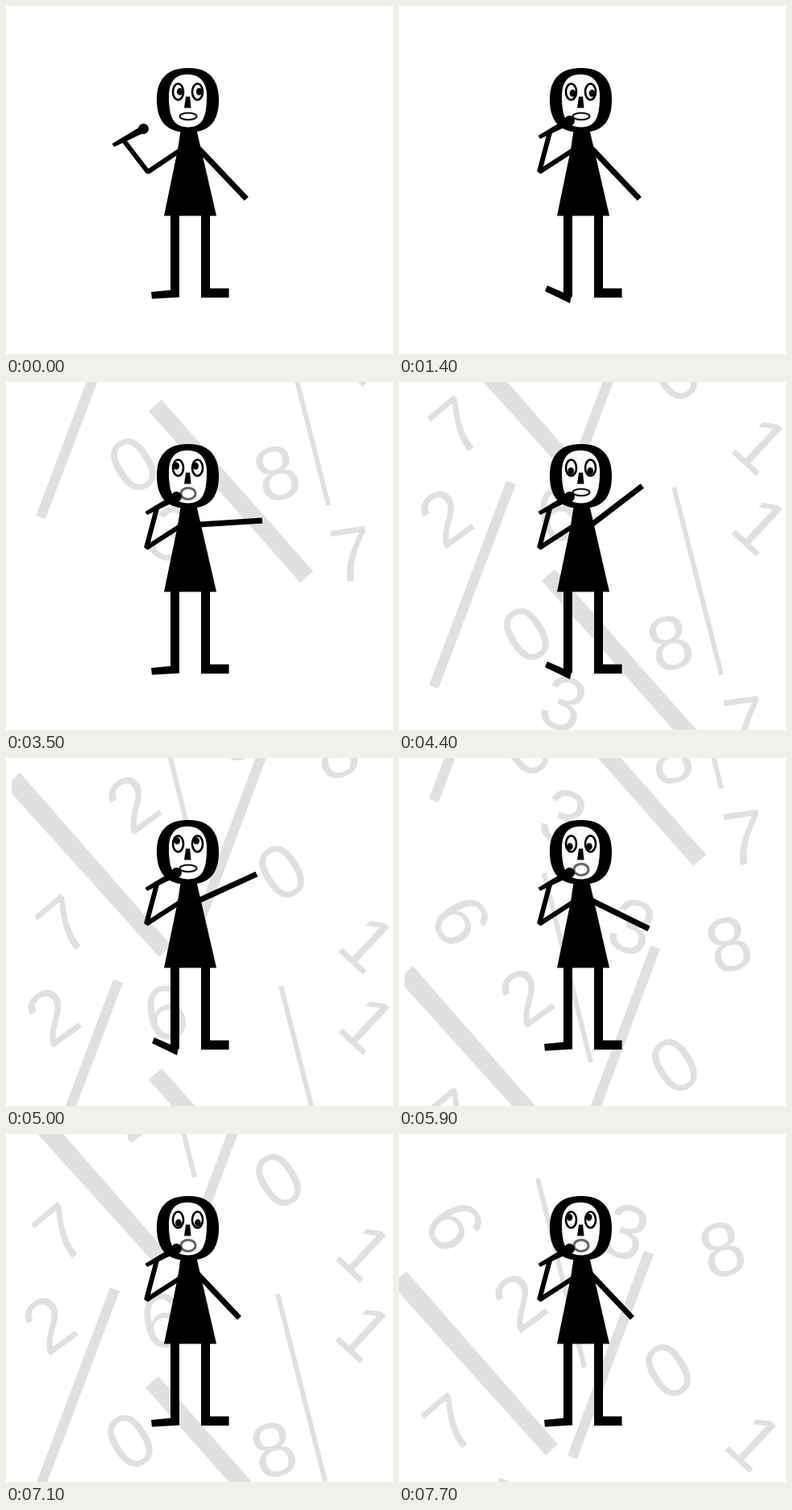
These frames come from a looping animation (480x432 px, 8 s). An HTML page:

```html
<!DOCTYPE html>
<html lang="en">
<head>
<meta charset="utf-8">
<title>Singer and falling numbers</title>
<style>
  html, body { margin: 0; overflow: hidden; background: #fff; }
  svg { display: block; width: 100vw; height: 100vh; }
  .rain { fill: #e0e0e0; stroke: #e0e0e0; }
  text { stroke: none; font: 95px "Liberation Sans", Arial, sans-serif; text-anchor: middle; }
  .limb { fill: none; stroke: #000; stroke-linejoin: bevel; }
  .eye { fill: #fff; stroke: #000; stroke-width: 2.6px; }
</style>
</head>
<body>
<svg viewBox="0 0 480 432">
  <defs>
    <g id="setA">
      <path d="M185 29L373 242" stroke-width="21.5"/>
      <path d="M139 -86L43 168" stroke-width="12.5"/>
      <path d="M341 -80L400 153" stroke-width="6"/>
    </g>
    <g id="setB">
      <path d="M17 258L7 268V284L190 487L205 473Z" stroke="none"/>
      <path d="M318 235L223 489" stroke-width="12.5"/>
      <path d="M180 143L238 378" stroke-width="6"/>
    </g>
    <ellipse id="oval" rx="6.5" ry="10"/>
    <ellipse id="pupil" rx="3.8" ry="4.5"/>
  </defs>
  <g class="rain" id="rain">
    <use href="#setA"/><use href="#setB"/><use href="#setA"/><use href="#setB"/>
  </g>

  <path class="limb" d="M209.500 259V361M247.500 259V362" stroke-width="11"/>
  <path d="M242 350.500H276.500V362H242Z"/>
  <path id="foot"/>
  <path d="M217 152H236L242 178L261 260.500H196L213 178Z"/>
  <path d="M225 77C250 76 264 90 264 116C264 146 250 157 226 157C202 157 187 146 187 116C187 91 200 77 225 77Z"/>
  <path fill="#fff" d="M225 85C241 85 249 95 249 112C249 137 244 150.500 226 150.500C207 150.500 202 137 202 112C202 95 209 85 225 85Z"/>
  <g transform="translate(213.500 106.500)">
    <use href="#oval" class="eye"/><use href="#oval" class="eye" x="24"/>
    <g id="pupils"><use href="#pupil"/><use href="#pupil" x="24"/></g>
  </g>
  <path d="M223 112.500H228L229.500 126.500H221Z"/>
  <ellipse id="mouth" cx="226" fill="#fff"/>
  <path class="limb" id="arm" stroke-width="7"/>
  <path class="limb" id="micArm" stroke-width="6"/>
  <g id="mic">
    <path d="M131.500 171L168 149L172 157L134 175Z"/>
    <circle cx="170.500" cy="152.500" r="6.500"/>
  </g>
</svg>
<script>
  const $ = id => document.getElementById(id);
  const set = (el, attrs) => {
    for (const k in attrs) el.setAttribute(k, attrs[k]);
  };
  const clamp = v => Math.min(1, Math.max(0, v));

  function digit(id, char, x, y, tilt) {
    const el = document.createElementNS("http://www.w3.org/2000/svg", "text");
    el.textContent = char;
    set(el, { y: 33, transform: `translate(${x} ${y}) rotate(${tilt})` });
    $(id).append(el);
  }
  digit("setA", 0, 158, 102, -32);
  digit("setA", 8, 336, 113, -18);
  digit("setA", 7, 428, 214, -8);
  digit("setA", 3, 204, 188, 20);
  digit("setA", 2, 57, -43, -36);
  digit("setA", 6, 198, -47, -12);
  digit("setA", 1, 449, -33, 43);
  digit("setB", 6, 77, 202, 60);
  digit("setB", 3, 289, 209, 20);
  digit("setB", 8, 409, 231, -18);
  digit("setB", 2, 157, 296, -36);
  digit("setB", 0, 342, 381, -32);
  digit("setB", 7, 72, 447, -40);
  digit("setB", 1, 449, 470, 43);

  // [step, distance], joined by a smooth curve
  const fall = [[0, -450], [6, -194], [10, 0], [15, 363], [18, 603], [20, 771], [24, 1233]];
  const last = fall.length - 1;

  function slope(k) {
    const a = fall[Math.max(0, k - 1)], b = fall[Math.min(last, k + 1)];
    return (b[1] - a[1]) / (b[0] - a[0]);
  }

  function fallAt(n) {
    let i = 0;
    while (i < last - 1 && n >= fall[i + 1][0]) i++;
    const [x0, y0] = fall[i], [x1, y1] = fall[i + 1];
    const h = x1 - x0, u = (n - x0) / h, v = 1 - u;
    return y0 * v * v * (1 + 2 * u) + y1 * u * u * (3 - 2 * u)
      + h * u * v * (slope(i) * v - slope(i + 1) * u);
  }

  function drawRain(n) {
    const y = fallAt(Math.max(0, n)), drift = -2 * Math.max(0, n - 20);
    [...$("rain").children].forEach((el, i) => {
      const lag = 603 * (i % 2) + 718 * (i >> 1);
      set(el, { transform: `translate(${drift} ${y - lag})` });
    });
  }

  function drawArm(n) {
    // one swing up and back, centred between its ends
    const u = Math.max(-1, Math.min(1, (n - 13.15) / 7.2));
    const a = (46.5 - 42 * (1 + Math.cos(Math.PI * u))) * Math.PI / 180;
    const lift = clamp((n - 18) / 2), len = 86 - 7 * clamp((n - 6) / 4);
    const x = 239 - 4 * lift, y = 177 - 6 * lift;
    set($("arm"), { d: `M${x} ${y}l${len * Math.cos(a)} ${len * Math.sin(a)}` });
  }

  function drawMic(n) {
    const up = clamp((n + 1) / 3);
    const x = 41 * up, y = -10 * up - 16 * up * (1 - up);
    set($("mic"), { transform: `translate(${x} ${y})` });
    set($("micArm"), { d: `M219 177L${176 - 2 * up} 206L${146 + x} ${167 + y}` });
  }

  function draw(n) {
    const beat = n > 0 && n % 2 === 1, open = n > 1 && !beat;
    drawRain(n);
    drawArm(n);
    drawMic(n);

    const roll = (n - 6.1) / 4.6 * 2 * Math.PI;
    set($("pupils"), { transform: `translate(${2.5 * Math.sin(roll) - .3} ${-4 * Math.cos(roll)})` });

    set($("foot"), { d: beat ? "M184 347L214 360L212 369L181 354Z"
                             : "M180 355L205 352.500H215V361.500L181 363.500Z" });
    set($("mouth"), open
      ? { cy: 138.5, rx: 9, ry: 7, stroke: "#666", "stroke-width": 3 }
      : { cy: 137, rx: 10.5, ry: 4.2, stroke: "#111", "stroke-width": 2 });
  }

  function tick() {
    const t = performance.now() % 8000;
    draw(Math.floor((t - 500) / 300));
    requestAnimationFrame(tick);
  }
  tick();
</script>
</body>
</html>
```
